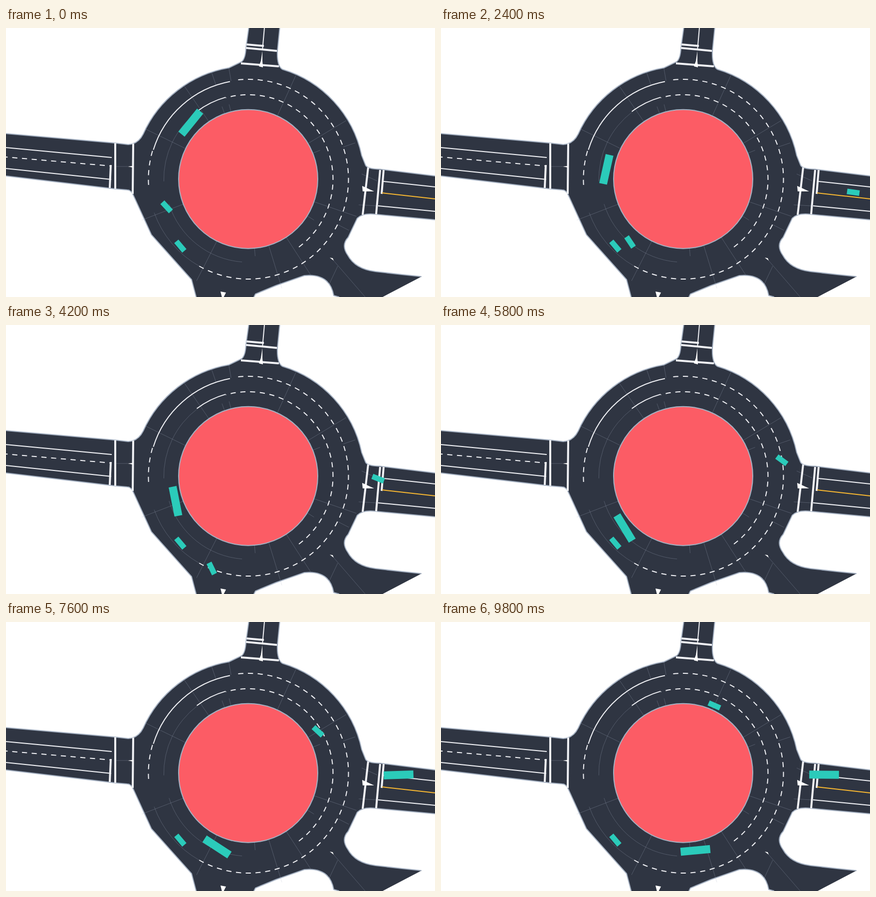
Animation, 860 px wide and 540 px high, one loop 9900 ms. Source, as an HTML page:

```html
<!DOCTYPE html>
<html lang="en">
<head>
<meta charset="utf-8">
<title>Roundabout traffic</title>
<style>
  html, body { margin: 0; width: 100%; height: 100%; overflow: hidden; background: #fff; }
  svg { display: block; width: 860px; height: 540px; }
  path { fill: none; }
  .road { fill: #2f3542; }
  .island { fill: #fc5c65; stroke: #a5b1c2; stroke-width: 2; }
  .edge { stroke: #a5b1c2; stroke-width: 2; }
  .faint { stroke: #a5b1c2; stroke-opacity: .3; stroke-width: 1; }
  .line { stroke: #f1f2f6; stroke-width: 2; }
  .dash { stroke: #f1f2f6; stroke-width: 2; stroke-dasharray: 10.3 9.25; }
  .stop { stroke: #f1f2f6; stroke-width: 4; }
  .mid { stroke: #f7b731; stroke-width: 2; }
  .arrow { fill: #fff; }
  rect { fill: #2bcbba; }
</style>
</head>
<body>
<svg id="stage" viewBox="0 0 860 540"></svg>
<script>
const LOOP = 9900, STEP = 100;
const CX = 486, CY = 303.5;
const ISLAND = 139.5, INNER = 169.7, OUTER = 200.5, KERB = 229;
const svg = document.getElementById('stage');

function add(tag, attrs) {
  const el = document.createElementNS('http://www.w3.org/2000/svg', tag);
  for (const k in attrs) el.setAttribute(k, attrs[k]);
  return svg.appendChild(el);
}
const draw = (cls, ...ds) => add('path', { class: cls, d: ds.map(d => 'M' + d).join('') });

// Points, arcs and spokes around the centre; angles in degrees
function polar(r, deg) {
  const a = deg * Math.PI / 180;
  return `${(CX + r * Math.cos(a)).toFixed(1)} ${(CY + r * Math.sin(a)).toFixed(1)}`;
}
const arc = (r, a, b) =>
  `${polar(r, a)}A${r} ${r} 0 ${+(Math.abs(b - a) > 180)} ${+(b > a)} ${polar(r, b)}`;
const spokes = (r1, r2, angles) => angles.map(a => `${polar(r1, a)}L${polar(r2, a)}`);

// Kerbs, clockwise from the west arm
const round = `A${KERB + 1} ${KERB + 1} 0 0 1`;
const kerbs = [
  `-5 211.5L219 231L245 234Q265 233 275 213${round} 447 80L472 68Q480 62 481 40L487 -3`,
  `549 -3L544 47Q543 76 554 83${round} 713 256L721 276Q725 283 750 283.5L865 297.6`,
  '865 385.5L741 374Q715 371 704 382L686 420Q671 436 685 456Q700 484 741 489L794 495L833 499',
  '668 540L657 537Q649 492 598 497L541 517L500 534L496 542',
  '382 543L372 505L291.5 415L254.5 334Q250 325 243 325L219 323L-5 296.5'
];
const [north, east, bay, south, west] = kerbs;
draw('road', `${north}L${east}L${bay}L755 540L${south}L${west}Z`);

draw('faint',
  arc(INNER, -127.3, -181.5), arc(INNER - 3, 162.6, 94.4), arc(OUTER, 160.4, 119.5),
  ...spokes(ISLAND, KERB, [-154, -124.5, -65.5, -31, 19, 57, 73, 117, 159]),
  ...spokes(ISLAND, 155, [-110, -104.5, -22, 32, 85]),
  ...spokes(OUTER, KERB - 3, [-109, -100, -18.8, 27]),
  '219 278H244', '713 293L744 307', '707 355L742 357',
  '656 466L720 540', '665 478L648 514');
draw('edge', ...kerbs);
add('circle', { class: 'island', cx: CX - .5, cy: CY - .3, r: ISLAND });

// Ring markings
draw('line', arc(OUTER - 1, -100.7, -162.8), arc(INNER + 1, -105.6, -127.3));
draw('dash', arc(OUTER, 119.5, -98.5));
draw('dash', arc(INNER, 53.4, -105.6));
draw('dash', arc(OUTER, 176.7, 197.2));

// Arm markings
draw('line', '0 240L212 260', '0 282L211 304', '518 0L514 45', '757 308L860 319', '746 357L860 368');
draw('dash', '-7 258.4L210 277');
draw('stop',
  '219 231V323', '210 275L208 321', '255 232L254 333',
  '481 40L543 46', '482 33L517 36', '471 71L547 77',
  '726 280L715 375', '750 285L742 374', '757 285L753 333');
draw('mid', '754 331L860 343');
draw('arrow',
  '244 278L254 277V280Z', '514 46L511 66L507 77L515 79L514 66Z',
  '714 317L738 328H715Z', '430 529L441 531L434 545Z', '649 461L655 462L657 467Z');

const BUS = [59.5, 16], CAR = [25, 11];
function vehicle([w, h]) {
  return add('rect', { x: -w / 2, y: -h / 2, width: w, height: h });
}
function place(el, x, y, turn) {
  el.setAttribute('transform', `translate(${x.toFixed(2)} ${y.toFixed(2)}) rotate(${turn.toFixed(2)})`);
}

// Waypoints: time, x, y, heading; each vehicle shows from its first one until `end`
const fleet = [
  { size: BUS, end: LOOP, way: [
    [0, 370.5, 190, 129], [1400, 341, 242, 116], [3300, 331, 320.5, 90],
    [5800, 368, 407.5, 58.8], [7600, 423, 451.5, 33], [9800, 510, 458.5, -5.3]] },
  { size: CAR, end: 5300, way: [
    [0, 322, 359, 47], [1400, 356, 398, 52], [3300, 397.5, 459, 60], [5200, 425.5, 522.5, 69]] },
  { size: CAR, end: LOOP, way: [
    [1400, 871.5, 335, 6.5], [3300, 786, 322.5, 11.8], [4200, 746, 308.5, 21.4],
    [5800, 683.3, 271.5, 36.6], [7600, 625.5, 219.5, 43.4], [9800, 548, 167.5, 23.5]] },
  { size: BUS, end: LOOP, way: [
    [6400, 798, 308, -3.4], [7600, 787, 307, -1.9], [9800, 768, 306.5, 0.6]] }
];
for (const v of fleet) v.el = vehicle(v.size);
place(vehicle(CAR), 349.5, 437.8, 49.8);

// Speed of column c at waypoint n; the ends continue the bend
function slope(way, n, c) {
  const rate = (i, j) => (way[j][c] - way[i][c]) / (way[j][0] - way[i][0]);
  const last = way.length - 1;
  if (n === 0) return 2 * rate(0, 1) - rate(0, 2);
  if (n === last) return 2 * rate(last - 1, last) - rate(last - 2, last);
  return rate(n - 1, n + 1);
}

function pose(way, t) {
  let i = 0;
  while (i < way.length - 2 && t >= way[i + 1][0]) i++;
  const a = way[i], b = way[i + 1], d = b[0] - a[0];
  const u = (t - a[0]) / d, w = 1 - u;
  return [1, 2, 3].map(c =>
    a[c] * w * w * (1 + 2 * u) + b[c] * u * u * (1 + 2 * w) +
    d * u * w * (slope(way, i, c) * w - slope(way, i + 1, c) * u));
}

function render(ms) {
  const t = Math.floor(ms % LOOP / STEP) * STEP;
  for (const v of fleet) {
    const on = t >= v.way[0][0] && t < v.end;
    v.el.setAttribute('visibility', on ? 'visible' : 'hidden');
    if (on) place(v.el, ...pose(v.way, t));
  }
}

let start = null;
function tick(now) {
  if (start === null) start = now;
  render(now - start);
  requestAnimationFrame(tick);
}
render(0);
requestAnimationFrame(tick);
</script>
</body>
</html>
```
